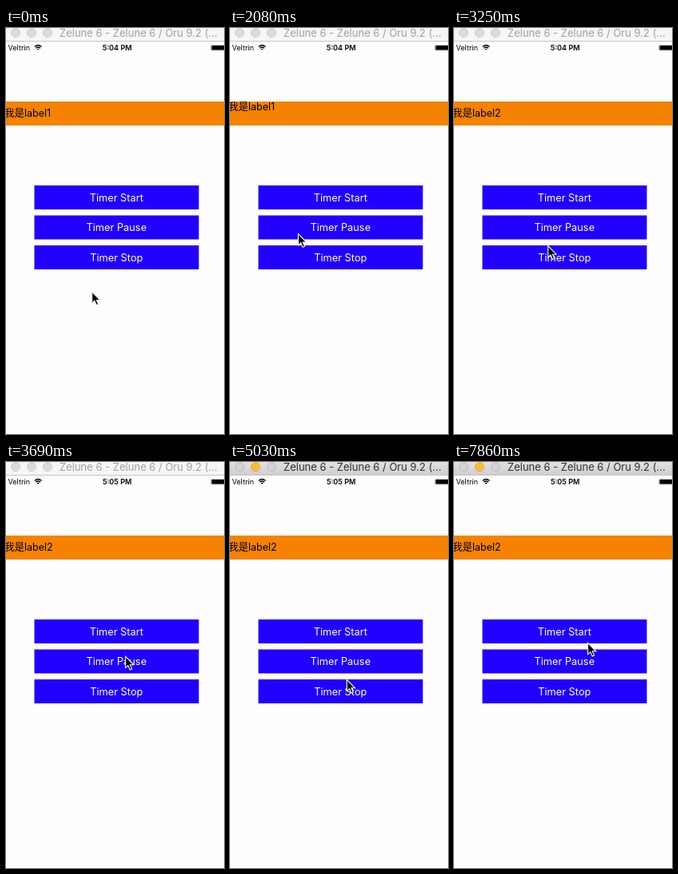
These frames come from a looping animation (273x508 px, 8 s). An HTML page:

```html
<!DOCTYPE html>
<html lang="en">
<head>
<meta charset="utf-8">
<title>Timer label</title>
<style>
html, body { margin: 0; width: 100%; height: 100%; overflow: hidden; background: #fefefe; }
svg { display: block; font-family: Inter, "Noto Sans CJK SC", "Noto Sans CJK", sans-serif; }
.dot { fill: #dcdcdc; stroke: #cdcdcd; }
.bar { fill: #f6f6f6; }
.title { fill: #a0a0a0; font-size: 13px; }
.active .bar { fill: url(#chrome); }
.active .title { fill: #303030; }
.active .dot { fill: #d5d3d5; stroke: #bdbbbd; }
.active .mid { fill: #fdbd2f; stroke: #e6a935; }
.status { font-size: 9.1px; }
.label { font-size: 12.5px; }
.button rect { fill: #2100ff; }
.button text { fill: #fff; font-size: 12.8px; text-anchor: middle; }
</style>
</head>
<body>
<svg width="273" height="508" viewBox="0 0 273 508">
  <defs>
    <linearGradient id="chrome" x2="0" y2="1">
      <stop stop-color="#e2e0e2"/><stop offset="1" stop-color="#d0ced0"/>
    </linearGradient>
    <clipPath id="strip"><path d="M0 92H273V122H0Z"/></clipPath>
  </defs>

  <g id="window">
    <rect class="bar" width="273" height="16"/>
    <path d="M0 16.5H273" stroke="#c6c6c6"/>
    <circle class="dot" cx="12" cy="6" r="5.5"/>
    <circle class="dot mid" cx="32" cy="6" r="5.5"/>
    <circle class="dot" cx="52" cy="6" r="5.5"/>
    <text class="title" x="67" y="11">Zelune 6 - Zelune 6 / Oru 9.2 (...</text>
  </g>

  <g class="status">
    <text x="2.5" y="28">Veltrin</text>
    <text id="clock" x="139.2" y="28" text-anchor="middle" font-weight="600"></text>
    <g fill="none" stroke="#000" stroke-width="1.4">
      <path d="M35.9 23.6Q40.2 19.6 44.5 23.6M37.5 25.3Q40.2 22.8 42.9 25.3"/>
      <path d="M40.2 27.8L38.9 26.4Q40.2 25.3 41.5 26.4Z" fill="#000" stroke="none"/>
    </g>
    <rect x="256.5" y="21.5" width="24" height="6.5" rx="1.2" fill="none" stroke="#999" stroke-width=".6"/>
    <rect x="257.5" y="22" width="22" height="5.5" rx=".5"/>
  </g>

  <rect y="92" width="273" height="30" fill="#f58200"/>
  <g clip-path="url(#strip)">
    <g id="labels" class="label">
      <text x="-2" y="111">我是label1</text>
      <text x="-2" y="141">我是label2</text>
    </g>
  </g>

  <g id="buttons"></g>

  <path id="cursor" d="M0 0V14.3L3.2 11.3L5.6 16.7L8 15.6L5.7 10.5H10.2Z"
    stroke="#fff" stroke-width="1.1" style="filter: drop-shadow(0 .8px .7px #0006)"/>
</svg>
<script>
const $ = id => document.getElementById(id);
const LOOP = 8000, TICK = 145;

// Pointer moves: each runs in ticks along a quadratic curve from the last position
const home = [107.7, 330];
const moves = [
  { at: 140, ticks: 4, via: [97, 294], to: [85.5, 257.5] },
  { at: 2960, ticks: 6, via: [118, 295], to: [149.7, 243.3] },
  { at: 3840, ticks: 6, via: [150, 322], to: [150, 253] },
  { at: 4880, ticks: 2, via: [149, 262], to: [146.3, 272.3] },
  { at: 7280, ticks: 1, via: [142, 268], to: [138, 265] },
  { at: 7425, ticks: 4, via: [53, 100], to: [167.6, 226.3] }
];

$("buttons").innerHTML = ["Start", "Pause", "Stop"].map((name, i) =>
  `<g class="button" transform="translate(35.5 ${197 + i * 37.5})">
    <rect width="206" height="30"/><text x="102.8" y="19.7">Timer ${name}</text>
  </g>`).join("");

const ease = p => p * p * (3 - 2 * p);
const clamp = p => Math.min(1, Math.max(0, p));
const ticksSince = (t, at) => Math.floor((t - at) / TICK) + 1;

function pointer(t) {
  let pos = home;
  for (const { at, ticks, via, to } of moves) {
    const s = ease(clamp(ticksSince(t, at) / ticks)), r = 1 - s;
    pos = pos.map((a, i) => r * r * a + 2 * r * s * via[i] + s * s * to[i]);
  }
  return pos;
}

function draw(t) {
  $("cursor").setAttribute("transform", `translate(${pointer(t)})`);
  const shift = 30 * ease(clamp((ticksSince(t, 1790) - .6) / 7));
  $("labels").setAttribute("transform", `translate(0 ${-shift})`);
  $("clock").textContent = t < 3400 ? "5:04 PM" : "5:05 PM";
  $("window").classList.toggle("active", t >= 3840);
}

const start = performance.now();
function frame() {
  draw((performance.now() - start) % LOOP);
  requestAnimationFrame(frame);
}
frame();
</script>
</body>
</html>
```
